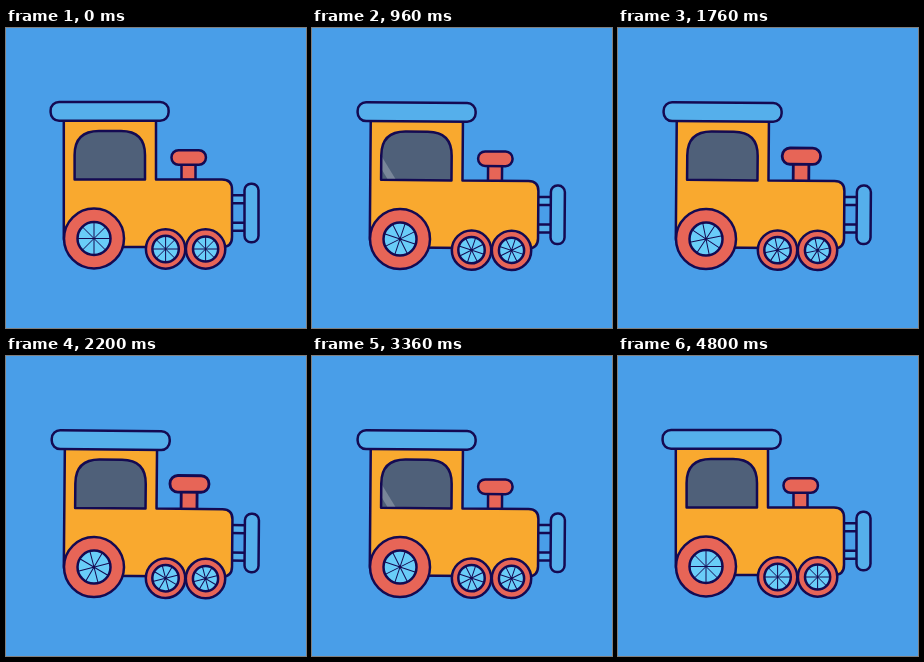
Animation, 300 px wide and 300 px high, one loop 4820 ms. Source, as an HTML page with a canvas:

```html
<!DOCTYPE html>
<html>
<head>
<meta charset="utf-8">
<style>
html, body { margin: 0; width: 100%; height: 100%; overflow: hidden; background: #499ee8; }
canvas { display: block; }
</style>
</head>
<body>
<canvas id="stage" width="300" height="300"></canvas>
<script>
const ctx = document.getElementById('stage').getContext('2d');
const LOOP = 4820, STEP = 20;
const INK = '#140a52', SKY = '#499ee8', ORANGE = '#f9a92f', RED = '#e76557';
const BLUE = '#55afeb', PALE = '#69cdf8', GLASS = '#4f6079';

// Eased 0 -> 1 -> 0 over one period
const swing = (t, period) => (1 - Math.cos(2 * Math.PI * t / period)) / 2;
const smooth = k => k * k * (3 - 2 * k);

function paint(fill, path) {
  ctx.fillStyle = fill;
  ctx.fill(path);
  ctx.stroke(path);
}

function box(fill, x, y, w, h, r = 0) {
  const path = new Path2D();
  path.roundRect(x, y, w, h, r);
  paint(fill, path);
}

function disc(fill, r) {
  const path = new Path2D();
  path.arc(0, 0, r, 0, 2 * Math.PI);
  paint(fill, path);
}

function about(x, y, draw) {
  ctx.save();
  ctx.translate(x, y);
  draw();
  ctx.restore();
}

function wheel(x, y, outer, inner, angle) {
  about(x, y, () => {
    disc(RED, outer);
    disc(PALE, inner);
    ctx.rotate(angle);
    ctx.lineWidth = 1;
    ctx.beginPath();
    for (let i = 0; i < 4; i++) {
      const dx = inner * Math.cos(i * Math.PI / 4);
      const dy = inner * Math.sin(i * Math.PI / 4);
      ctx.moveTo(-dx, -dy);
      ctx.lineTo(dx, dy);
    }
    ctx.stroke();
  });
}

function chimney(t) {
  about(182.5, 152, () => {
    const scale = 1 + 0.135 * smooth(swing(t, 480));
    ctx.scale(scale, scale);
    box(RED, -7, -17, 14, 17);
    box(RED, -17, -29.8, 34.4, 14.6, 7);
  });
}

function cabin() {
  paint(ORANGE, new Path2D(
    'M57.8 84H150V151.5H216Q226 151.5 226 161.5V209Q226 219 216 219H68Q57.8 219 57.8 209Z'));
}

function shine(x, width) {
  const lean = 30;
  ctx.beginPath();
  ctx.moveTo(x, 151.5);
  ctx.lineTo(x - lean, 103);
  ctx.lineTo(x - lean + width, 103);
  ctx.lineTo(x + width, 151.5);
  ctx.fill();
}

function glass(t) {
  const pane = new Path2D('M68.6 151.5V127Q68.6 103 93 103H115Q139 103 139 127V151.5Z');
  ctx.fillStyle = GLASS;
  ctx.fill(pane);
  ctx.save();
  ctx.clip(pane);
  ctx.fillStyle = 'rgba(255,255,255,0.24)';
  const x = 164 - 0.115 * (t % 2400);
  shine(x, 14);
  shine(x + 22, 8);
  ctx.restore();
  ctx.stroke(pane);
}

function train(t) {
  ctx.strokeStyle = INK;
  ctx.lineWidth = 2.5;
  ctx.lineJoin = 'round';
  const sway = swing(t, 400);
  about(62, 212 + 0.35 * sway, () => {
    ctx.rotate(0.5 * Math.PI / 180 * sway);
    ctx.translate(-62, -212);
    chimney(t);
    box(BLUE, 224, 167.3, 16, 8);
    box(BLUE, 224, 194.8, 16, 8);
    box(BLUE, 238.5, 155.8, 14, 58.4, 6.5);
    cabin();
    glass(t);
    box(BLUE, 44.6, 74, 118, 18.8, 8.5);
    const angle = 2 * Math.PI * t / 1200;
    wheel(88, 210.5, 30, 16.5, angle);
    wheel(159.6, 221, 19.7, 13.2, angle);
    wheel(199.6, 221, 19.7, 12.6, angle);
  });
}

function frame(now) {
  const t = Math.floor((now % LOOP) / STEP) * STEP;
  ctx.fillStyle = SKY;
  ctx.fillRect(0, 0, 300, 300);
  train(t);
  requestAnimationFrame(frame);
}
requestAnimationFrame(frame);
</script>
</body>
</html>
```
